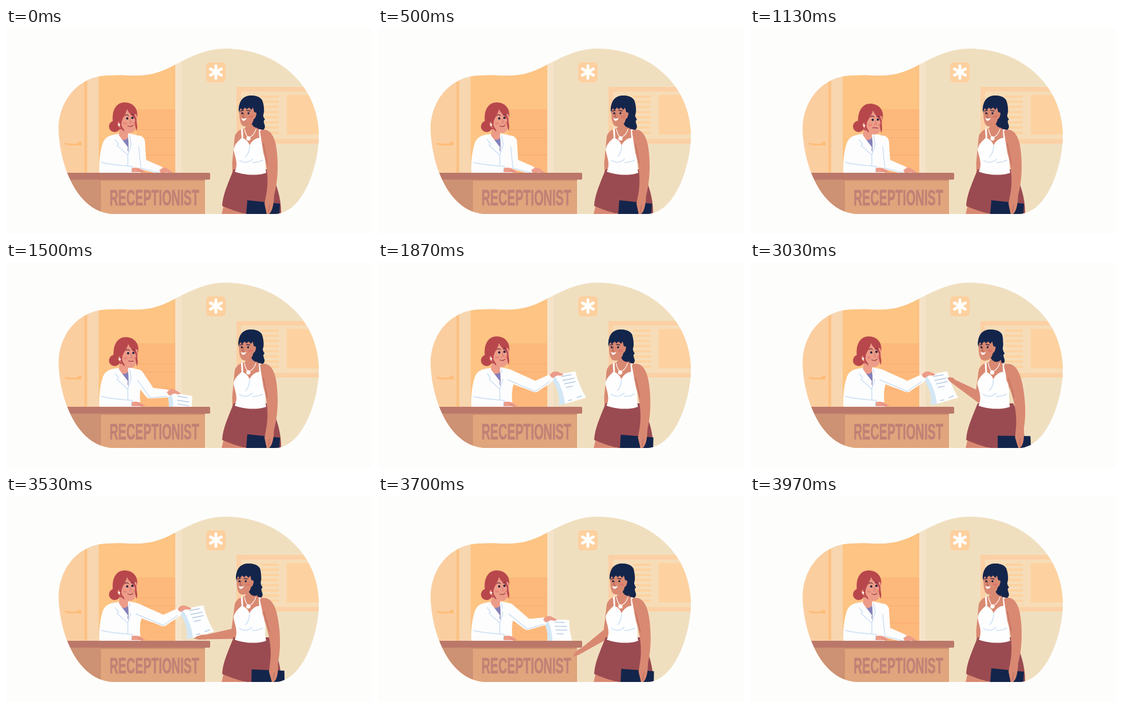
Write an HTML page that moves like this. It is 640 by 360 pixels and loops after 4010 ms.

```html
<!DOCTYPE html>
<html lang="en">
<head>
<meta charset="utf-8">
<title>Reception desk</title>
<style>
  html, body { margin: 0; width: 100%; height: 100%; overflow: hidden; background: #fdfdfc; }
  svg { display: block; width: 100%; height: 100%; }
  .line { fill: none; stroke-linecap: round; stroke-linejoin: round; }
  .fold { fill: none; stroke: #cbdff3; stroke-width: 1.5; stroke-linecap: round; stroke-linejoin: round; }
  .pale { fill: #ec9c88; }
  .tan { fill: #d98972; }
  .coat { fill: #fdfdfe; }
  .red { fill: #b8474c; }
  .black { fill: #14254b; }
  .sign { font: bold 38px "Liberation Sans", Arial, sans-serif; fill: #c18176; stroke: #c18176; stroke-width: .7; }
</style>
</head>
<body>
<svg viewBox="0 0 640 360">
  <defs>
    <clipPath id="blob">
      <path d="M92 175C93 125 128 84 178 83C205 81 225 85 245 82C290 78 322 37 383 36C475 36 547 100 547 190C547 238 520 325 470 325H190C125 325 93 240 92 175Z"/>
    </clipPath>
  </defs>
  <g clip-path="url(#blob)">
    <g id="room">
      <path fill="#f0dfbf" d="M90 30H550V330H90Z"/>
      <path fill="#fbcea0" d="M90 80H137V330H90Z"/>
      <path fill="#fcc284" d="M137 80H142V330H137Z"/>
      <path fill="#f7d6b0" d="M142 80H162V330H142Z"/>
      <path fill="#fdc483" d="M162 40H296V330H162Z"/>
      <path fill="#fdb97b" d="M228 142H296V253H228Z"/>
      <path class="line" stroke="#fbb074" stroke-width="2" d="M228 178H296M228 192H296M228 222H296"/>
      <path fill="#f5e3c9" d="M296 40H307V330H296Z"/>
      <path class="line" stroke="#fdbd78" stroke-width="3" d="M104 202C112 205 120 204 129 203"/>
      <circle cx="129" cy="202" r="3.5" fill="#fdbd78"/>
      <rect x="350" y="60" width="34" height="35" rx="6" fill="#fdd09f"/>
      <path class="line" stroke="#fefefd" stroke-width="5" d="M367 66V88M357.5 71.5L376.5 82.5M376.5 71.5L357.5 82.5"/>
      <path fill="#fbd0a5" d="M403 103H550V202H403Z"/>
      <path fill="#f6dcb7" d="M411 111H550V194H411Z"/>
      <path fill="none" stroke="#fdd29f" stroke-width="4" d="M446 120H477M446 129H477M446 138H477M446 147H477M446 156H477M446 165H477M446 174H477M446 183H477"/>
      <path fill="#fdd2a0" d="M491 117H550V186H491Z"/>
    </g>

    <g id="receptionist">
      <circle class="red" cx="190" cy="172" r="10"/>
      <path class="coat" d="M199 185C184 187 174 188 169 202C164 218 162 238 163 254H236C234 242 233 226 237 214L238 193C232 187 225 186 213 184Z"/>
      <path fill="#8580b9" d="M196 192L215 190L214 216Z"/>
      <path class="pale" d="M199 174H213L214 191C210 197 202 197 197 191Z"/>
      <path class="coat" d="M197 187L190 195L212 220L213 208ZM213 186L219 194L214 220L215 207Z"/>
      <path class="fold" d="M191 195L197 203L194 205L213 222L219 203L216 188M213 222V245"/>
      <g id="paper">
        <path fill="#d3e7f5" d="M-13 4L8 0L18 51L3 54C6 40 0 20-13 4Z"/>
        <path fill="#fdfeff" d="M-5 2L32-5C36 12 44 29 51 41L14 52C12 34 6 17-5 2Z"/>
        <path class="line" stroke="#b4c8e2" stroke-width="1.4" d="M8 4L25 1M10 11L30 7M13 17L32 13M16 23L27 21M35 41L43 38M20 46L26 45"/>
      </g>
      <path id="sleeve" class="coat"/>
      <path id="sleeveFold" class="fold"/>
      <path id="giver" class="pale" d="M-13 2C-8-6-2-6 4-3L11 0C11 3 5 3 1 2L-8 7Z"/>
      <path class="coat" d="M166 228C175 235 198 239 221 242L221 253H164Z"/>
      <path class="fold" d="M167 235C183 239 200 240 221 242L219 251"/>
      <path class="pale" d="M220 245C229 242 237 246 244 252H220Z"/>
      <path class="line" stroke="#cf7c70" d="M231 248L238 252"/>

      <g id="womanFace">
        <path class="red" d="M187 165C184 144 193 130 207 130C223 130 232 142 229 157L224 177H199Z"/>
        <path class="pale" d="M200 153C203 149 208 145 212 141C216 148 222 150 228 151C231 164 229 177 222 182C214 186 204 181 200 174C193 172 194 163 200 163Z"/>
        <path class="red" d="M212 139C210 153 202 157 202 167C201 174 207 175 207 181C201 177 198 171 198 164C186 160 196 133 212 139ZM211 139C220 142 225 151 228 159C227 167 232 171 228 180C227 172 224 168 226 161C223 153 214 150 211 140Z"/>
        <circle cx="198" cy="169" r="1.7" fill="#fff"/>
        <g fill="#1e2444">
          <circle cx="212" cy="158" r="2"/>
          <circle cx="221" cy="157" r="2"/>
        </g>
        <path class="line" stroke="#7c3340" stroke-width="1.5" d="M208 153Q211 150 214 153M219 152Q222 150 224 152"/>
        <path class="line" stroke="#d67b70" stroke-width="1.3" d="M217 159L219 165L216 166"/>
        <path fill="#e7776f" opacity=".55" d="M205 165h6v4h-6ZM222 164h4v4h-4Z"/>
        <path id="mouth" class="line" stroke="#a4434c" stroke-width="1.4"/>
      </g>
    </g>

    <g id="desk">
      <path fill="#cd9173" d="M90 264H166V330H90Z"/>
      <path fill="#e0a57d" d="M166 264H348V330H166Z"/>
      <path fill="#cb8d70" d="M166 264H348V267H166Z"/>
      <path fill="#bb786a" d="M90 253H355Q357 253 357 255V263Q357 265 355 265H90Z"/>
      <text class="sign" transform="translate(181 309.5) scale(.558 1)">RECEPTIONIST</text>
    </g>

    <g id="visitor">
      <path id="reach" class="tan"/>
      <path id="reachHand" class="tan" d="M-2-4L10-3L19 0L14 3L5 5L-2 4Z"/>
      <path class="tan" d="M381 308H416V330H376Z"/>
      <path fill="#9a4b51" d="M398 247H460C472 268 482 298 481 325H420C403 321 390 316 378 311C379 290 390 268 398 247Z"/>
      <g id="torso">
        <path id="backHair" class="black" d="M411 136C417 118 439 113 448 126C453 138 445 150 453 160C446 164 458 171 450 178C441 181 434 175 431 165Z"/>
        <path class="tan" d="M421 163H439L440 176C452 178 462 181 464 194L454 220H402C398 203 397 181 412 177C420 176 421 171 421 163Z"/>
        <path fill="#fefefe" d="M411 177L414 176L415 193C419 194 424 199 426 205C430 196 438 192 443 192L442 177L446 178L449 207C457 220 451 232 455 253C440 259 415 257 400 251C407 237 400 224 398 213C399 203 407 197 412 192Z"/>
        <path class="fold" d="M408 231C416 237 425 235 431 229M426 206Q426 218 419 225M431 235C438 235 443 234 449 231"/>
        <path class="line" stroke="#fdeee8" stroke-width="1.3" d="M417 177Q419 187 424 192Q434 188 437 177"/>
        <circle cx="424" cy="193" r="3.7" fill="#fefcfa"/>
      </g>
      <g id="carry">
        <path class="black" d="M422 301L479 307L478 327L420 325Z"/>
        <path class="tan" d="M444 180C456 173 468 183 472 205C476 227 477 262 469 292L468 304C466 319 462 326 456 326L452 307L455 291C460 266 456 239 450 218Z"/>
        <path class="line" stroke="#b3665b" d="M450 202Q454 219 457 237M461 309L459 321"/>
      </g>
      <g id="visitorFace">
        <path class="black" d="M408 148C405 128 415 118 428 118C443 117 451 127 451 140C453 153 443 160 449 169C443 177 434 176 430 168L412 157Z"/>
        <path class="tan" d="M409 139L433 137C435 144 440 147 437 154C436 158 434 158 433 160C431 170 422 175 414 171C409 167 407 155 409 139Z"/>
        <path class="black" d="M407 146C406 128 416 119 429 120C441 122 443 134 438 148L434 147L432 139L429 143L425 139L421 142L418 139L413 144L411 140Z"/>
        <g fill="#16213f">
          <circle cx="413" cy="149" r="1.8"/>
          <circle cx="424" cy="149" r="1.8"/>
        </g>
        <path class="line" stroke="#3c2c44" stroke-width="1.4" d="M410 145L415 144M421 144L427 145"/>
        <path class="line" stroke="#a9594f" stroke-width="1.2" d="M416 149L414 155L417 156"/>
        <path fill="#dc6c64" opacity=".6" d="M425 153h7v4h-7Z"/>
        <path fill="#fefefe" d="M411 157Q416 160 421 157Q419 163 414 162Z"/>
      </g>
    </g>
  </g>
</svg>
<script>
const LOOP = 4010;
const el = id => document.getElementById(id);
const set = (id, name, value) => el(id).setAttribute(name, value);
const mix = (a, b, k) => a + (b - a) * k;
const mixPoint = (a, b, k) => [mix(a[0], b[0], k), mix(a[1], b[1], k)];
const ease = (t, from, to) => {
  const k = Math.min(1, Math.max(0, (t - from) / (to - from)));
  return k * k * (3 - 2 * k);
};
// Rises over [inA, inB] and falls over [outA, outB].
const pulse = (t, inA, inB, outA, outB) => ease(t, inA, inB) - ease(t, outA, outB);

// Rounded bar between two points with its own radius at each end.
function bar(a, b, ra, rb) {
  const angle = Math.atan2(b[1] - a[1], b[0] - a[0]);
  const nx = -Math.sin(angle), ny = Math.cos(angle);
  const at = (p, r) => `${p[0] + nx * r} ${p[1] + ny * r}`;
  return `M${at(a, ra)}A${ra} ${ra} 0 0 1 ${at(a, -ra)}L${at(b, -rb)}A${rb} ${rb} 0 0 1 ${at(b, rb)}Z`;
}
const limb = (joints, [r0, r1, r2]) =>
  bar(joints[0], joints[1], r0, r1) + bar(joints[1], joints[2], r1, r2);

function drawReceptionist(t) {
  const offer = pulse(t, 1280, 1780, 3550, 3930);
  const nod = pulse(t, 720, 1100, 1250, 1850);
  const shoulder = mixPoint([232, 199], [227, 198], offer);
  const elbow = mixPoint([236, 237], [275, 218], offer);
  const wrist = mixPoint([268, 248], [300, 204], offer);
  const hand = mixPoint([281, 250], [313, 196], offer);

  set("sleeve", "d", limb([shoulder, elbow, wrist], [11, 9.5, 7]));
  const under = p => `${p[0]} ${p[1] + 8}`;
  set("sleeveFold", "d", `M${under(shoulder)}L${under(elbow)}L${wrist[0]} ${wrist[1] + 5}`);
  set("giver", "transform", `translate(${hand}) rotate(${mix(14, 0, offer)})`);
  set("paper", "transform", `translate(${hand}) rotate(${mix(35, 0, offer)})`);
  set("womanFace", "transform", `translate(${nod} ${2 * nod}) rotate(${4 * nod} 206 180)`);
  set("mouth", "d", `M213 ${171 + nod}Q218 ${174 - 3 * nod} 222 ${170 + 2 * nod}`);
}

function drawVisitor(t) {
  const lean = pulse(t, 1300, 2450, 3200, 3930);
  const swing = pulse(t, 1500, 2700, 3280, 3950);
  const reach = pulse(t, 1900, 2300, 3550, 3940);
  const lift = pulse(t, 2430, 2930, 3060, 3480);

  const elbow = mixPoint([403, 236], [403, 240 - 3 * lift], reach);
  const angle = 92 + 81 * reach + 38 * lift;
  const turn = angle * Math.PI / 180;
  const wrist = [elbow[0] + 56 * Math.cos(turn), elbow[1] + 56 * Math.sin(turn)];

  set("reach", "d", limb([[408, 190], elbow, wrist], [8, mix(7.5, 9.5, reach), 3.8]));
  set("reachHand", "transform", `translate(${wrist}) rotate(${angle}) scale(${1 - 0.4 * lift} 1)`);
  set("torso", "transform", `translate(${swing - 1.5 * lean} 0)`);
  set("backHair", "transform", `translate(${-7 * lean} 0)`);
  set("visitorFace", "transform", `translate(${-8.5 * lean} 0)`);
  set("carry", "transform", `rotate(${-5.4 * swing} 455 185)`);
}

function draw() {
  const t = performance.now() % LOOP;
  drawReceptionist(t);
  drawVisitor(t);
  requestAnimationFrame(draw);
}
draw();
</script>
</body>
</html>
```
